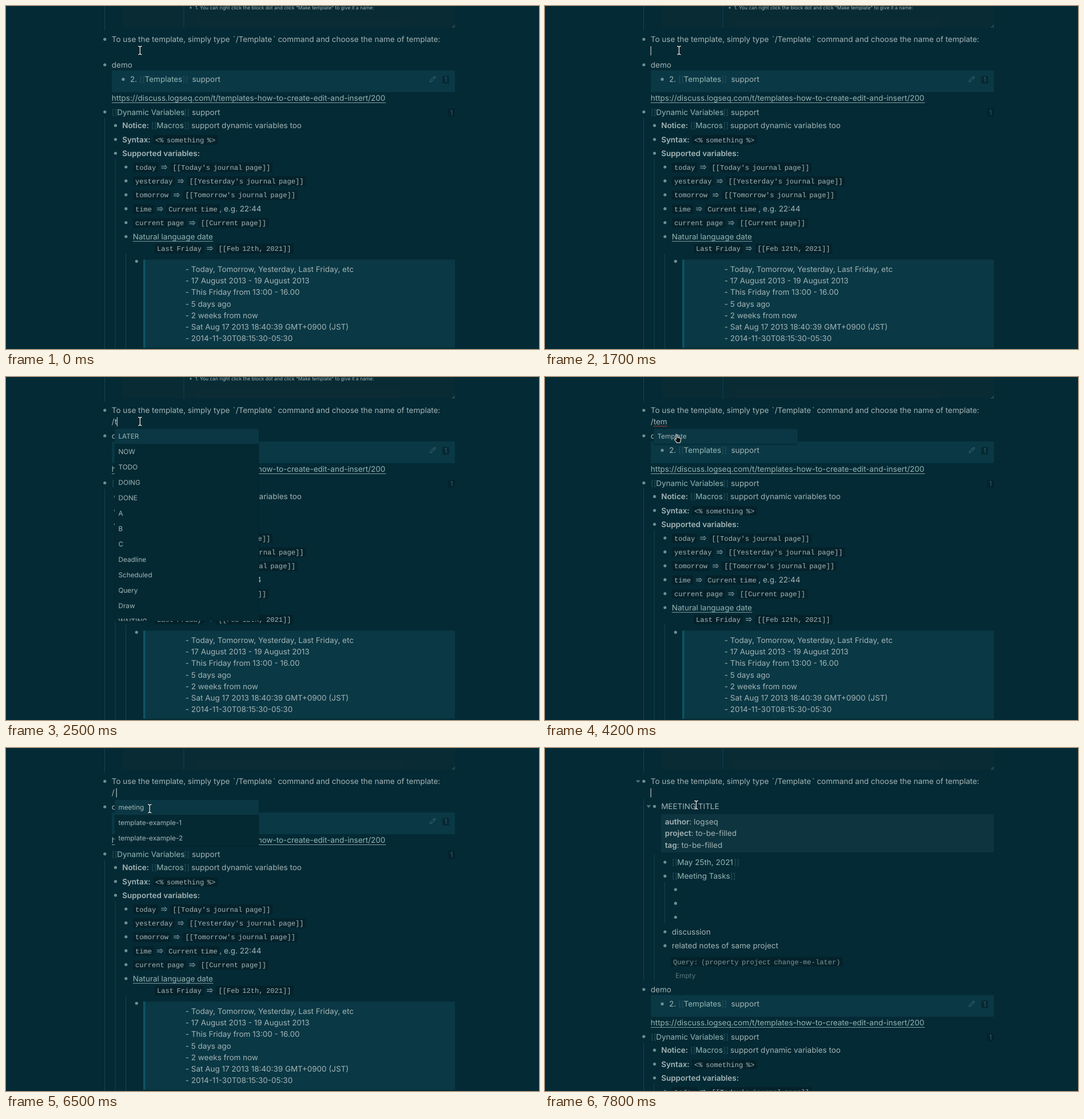
An HTML page that plays this animation: 932 px wide and 601 px high, repeating every 8 s.

```html
<!DOCTYPE html>
<html lang="en">
<head>
<meta charset="utf-8">
<title>Template demo</title>
<style>
  html, body { margin: 0; width: 100%; height: 100%; overflow: hidden; background: #042a35; }
  svg { display: block; width: 932px; height: 601px; }
  text { font: 13.47px Inter, sans-serif; fill: #a4b5b6; white-space: pre; text-rendering: geometricPrecision; }
  .b { font-weight: 600; }
  .link { fill: #96b7b4; }
  .dim { fill: #24505a; }
  .small { font-size: 11.79px; }
  .tiny { font-size: 8.44px; }
  .mono { font: 12.12px "Liberation Mono", monospace; word-spacing: -1.82px; }
  .faint { fill: #7d9698; }
  .empty { fill: #5c787e; }
  .count { fill: #34606b; font-size: 11.79px; }
  .menu { filter: drop-shadow(0 1px 1px rgba(0, 0, 0, .2)); }
</style>
</head>
<body>
<svg id="stage" viewBox="0 0 932 601"></svg>
<script>
const LOOP = 8000, SHIFT = 320;
const ADVANCE = 7.273, SPACE_CUT = 1.82, ARROW_GAP = 21.2;

// y is the middle of the capitals; the baseline lies below it
const text = (x, y, s, cls = '', drop = 4.9) =>
  `<text x="${x}" y="${y + drop}" class="${cls}">${s}</text>`;
const small = (x, y, s, cls = '') => text(x, y, s, 'small ' + cls, 4.3);
const rect = (x, y, w, h, fill, r = 0) =>
  `<rect x="${x}" y="${y}" width="${w}" height="${h}" rx="${r}" fill="${fill}"/>`;
const dot = (x, y, r = 2.6) => `<circle cx="${x}" cy="${y}" r="${r}" fill="#708e93"/>`;
const guide = (x, y1, y2) => rect(x - .5, y1, 1, y2 - y1, '#104653');
const fold = (x, y) => `<path d="M${x - 4} ${y - 2}h8l-4 4.6z" fill="#4f757c"/>`;
const escape = s => s.replace(/</g, '&lt;').replace(/>/g, '&gt;');

const codeWidth = s => s.length * ADVANCE - (s.split(' ').length - 1) * SPACE_CUT + 8;
const code = (x, y, s, cls = '') =>
  rect(x, y - 8.3, codeWidth(s), 17, '#05222b', 3) +
  text(x + 4, y, escape(s), 'mono ' + cls, 4.2);

const arrow = (x, y) =>
  `<path d="M${x} ${y - 1.6}h8.4M${x} ${y + 1.6}h8.4M${x + 6.4} ${y - 3.8}l3.8 3.8l-3.8 3.8" fill="none" stroke="#a4b5b6"/>`;

const mapping = (x, y, from, to) => {
  const end = x + codeWidth(from);
  return code(x, y, from) + arrow(end + 5, y) + code(end + ARROW_GAP, y, to);
};

const pageLink = (x, y, name, endX) =>
  text(x, y, '[[', 'dim') + text(x + 9.3, y, name, 'link') + text(endX, y, ']]', 'dim');

const underlined = (x, y, s, w) =>
  text(x, y, s, 'link') + rect(x, y + 7.8, w, .9, '#8fb0ae');

const count = (x, y) =>
  rect(x - 6, y - 6.6, 12, 13.6, 'rgba(4, 32, 41, .6)', 2) + text(x - 2.6, y, '1', 'count', 4.2);

const pencil = `<path d="M741.6 132.8l.8-3l6.2-6.2q1.1-.7 2 .2q.8 1 .1 2l-6.2 6.2zM747.2 125l2.2 2.2" fill="none" stroke="#45707a" stroke-width=".9"/>`;

function topPart() {
  return rect(203.5, 0, 581.5, 38, '#082b34') +
    rect(330, 22, 363, 15, '#0b2c34') +
    guide(172.5, 0, 43) + guide(311, 0, 38) +
    '<path d="M780 38l5-5M783 38l2-2" stroke="#5c777c" stroke-width=".9"/>' +
    `<g id="tip">${dot(323, 3, 1.7)}${text(330.7, 3, '1. You can right click the block dot and click "Make template" to give it a name:', 'tiny', 3)}</g>` +
    dot(172.8, 58.3) +
    text(184.8, 58.2, 'To use the template, simply type') +
    text(396.7, 58.2, '`') + text(401.7, 58.2, '/Template') + text(467, 58.2, '`') +
    text(475.4, 58.2, 'command and choose the name of template:');
}

function lowerPart() {
  const rows = [
    ['today', "[[Today's journal page]]"],
    ['yesterday', "[[Yesterday's journal page]]"],
    ['tomorrow', "[[Tomorrow's journal page]]"],
    ['time', 'Current time'],
    ['current page', '[[Current page]]']
  ];
  const dates = [
    'Today, Tomorrow, Yesterday, Last Friday, etc',
    '17 August 2013 - 19 August 2013',
    'This Friday from 13:00 - 16.00',
    '5 days ago',
    '2 weeks from now',
    'Sat Aug 17 2013 18:40:39 GMT+0900 (JST)',
    '2014-11-30T08:15:30-05:30'
  ];
  return guide(172.5, 196, 601) + guide(191, 268, 601) + guide(209.5, 434, 601) +
    dot(172.8, 103) + text(184.8, 103, 'demo') +
    rect(185, 113, 600, 38, '#0a3845') +
    dot(205, 128.4) + text(217, 128.4, '2.') + pageLink(233.3, 128.4, 'Templates', 308.3) +
    text(325.5, 128.4, 'support') + pencil + count(769, 129) +
    underlined(184.8, 161.2, 'https://discuss.logseq.com/t/templates-how-to-create-edit-and-insert/200', 479.5) +
    dot(172.8, 185.6) + pageLink(185, 185.6, 'Dynamic Variables', 311) +
    text(325, 185.6, 'support') + count(779, 186.5) +
    dot(191.5, 209.4) + text(203.2, 209.4, 'Notice:', 'b') + pageLink(254, 209.4, 'Macros', 311) +
    text(324, 209.4, 'support dynamic variables too') +
    dot(191.5, 233.8) + text(203.2, 233.8, 'Syntax:', 'b') + code(257, 234.3, '<% something %>') +
    dot(191.5, 258) + text(203.2, 258, 'Supported variables:', 'b') +
    rows.map(([from, to], i) => {
      const y = 282.4 + i * 24.4;
      return dot(209.8, y - .4) + mapping(222, y, from, to);
    }).join('') +
    text(373.3, 355.2, ', e.g. 22:44') +
    dot(209.8, 404) + underlined(221.8, 404, 'Natural language date', 140.5) +
    mapping(260, 424.7, 'Last Friday', '[[Feb 12th, 2021]]') +
    dot(228.3, 447.3) +
    rect(240, 444.3, 545, 154.5, '#0a3845') + rect(240, 444.3, 3.6, 154.5, '#0f5362') +
    dates.map((s, i) => text(313.8, 461 + i * 20.2, '- ' + s)).join('');
}

function meetingPart() {
  const property = (y, key, value) =>
    `<text x="209.8" y="${y + 4.9}"><tspan class="b">${key}</tspan>: ${value}</text>`;
  return guide(172.5, 89, 408) + guide(191, 187, 408) + guide(209.5, 235, 307) +
    fold(181.3, 102.3) + dot(191.5, 102.3) + text(203.2, 102.2, 'MEETING TITLE') +
    rect(203, 116, 582, 67, '#0d343f') +
    property(129.3, 'author', 'logseq') + property(149.5, 'project', 'to-be-filled') + property(169.7, 'tag', 'to-be-filled') +
    [200, 224.4, 322, 346.4].map(y => dot(209.8, y)).join('') +
    [248, 272.2, 296.5].map(y => dot(228.3, y)).join('') +
    pageLink(222, 200, 'May 25th, 2021', 330) + pageLink(222, 224.4, 'Meeting Tasks', 323.6) +
    text(221.8, 322, 'discussion') + text(221.8, 346.4, 'related notes of same project') +
    code(220, 374.3, 'Query: (property project change-me-later)', 'faint') +
    small(228, 398.6, 'Empty', 'empty');
}

const ROW = 26.94;
function menu(id, items, h = items.length * ROW) {
  return `<g id="${id}" class="menu"><clipPath id="${id}Clip"><rect x="190" y="91" width="252" height="${h}" rx="3"/></clipPath>` +
    `<g clip-path="url(#${id}Clip)">` + rect(190, 91, 252, h, '#042933') + rect(190, 91, 252, 26.2, '#0a3743') +
    items.map((s, i) => small(196.4, 104.1 + i * ROW, s)).join('') + '</g></g>';
}

const beamPath = 'M-2.8-7.3q2.3 0 2.8 1.6q.5-1.6 2.8-1.6M0-6V6M-2.8 7.3q2.3 0 2.8-1.6q.5 1.6 2.8 1.6';
const beam = id => `<g id="${id}" fill="none" stroke-linecap="round">` +
  `<path d="${beamPath}" stroke="#07161b" stroke-width="2.8"/><path d="${beamPath}" stroke="#eef2f2" stroke-width="1.3"/></g>`;
const hand = `<g id="hand"><path d="M-1.1 8.2V1a1.2 1.2 0 0 1 2.4 0V5l4.6 1q1.5.5 1.3 2l-.6 3.4l-1 2.9H.6L-3.9 9q.4-1.7 1.8-1.4z" fill="#0b0f11" stroke="#eef2f2" stroke-width="1.1" stroke-linejoin="round"/></g>`;

const $ = id => document.getElementById(id);
$('stage').innerHTML = topPart() +
  `<g id="lower">${lowerPart()}</g><g id="meeting">${meetingPart()}</g>` +
  `<g id="topFold">${fold(162.8, 58.5)}</g>` +
  '<text id="typed" x="184.8" y="83.3"></text>' +
  '<path id="squiggle" d="M190 86.3H213.5" stroke="#b8433d" stroke-width="1.5" stroke-dasharray="1.6 .9"/>' +
  menu('commands', ['LATER', 'NOW', 'TODO', 'DOING', 'DONE', 'A', 'B', 'C', 'Deadline', 'Scheduled', 'Query', 'Draw', 'WAITING'], 336.5) +
  menu('match', ['Template']) +
  menu('templates', ['meeting', 'template-example-1', 'template-example-2'], 80) +
  '<rect id="caret" y="70.5" width="1.2" height="16" fill="#b9c7c8"/>' +
  beam('trail') + beam('beam') + hand;

// Each step changes only the listed properties.
const steps = [
  [0, { typed: '', caret: 0, menu: '', cursor: 'beam', x: 234.4, y: 77.8, done: false, trail: false, fold: false }],
  [500, { caret: 184.5 }],
  [1100, { caret: 0 }],
  [1700, { caret: 184.5 }],
  [1900, { typed: '/', caret: 189.9, menu: 'commands' }],
  [2500, { typed: '/t', caret: 193.8 }],
  [4200, { typed: '/tem', caret: 0, menu: 'match', cursor: 'hand', x: 230.4, y: 101 }],
  [4400, { caret: 213.4, x: 231, y: 102 }],
  [4700, { typed: '/ ', caret: 192.6, menu: 'templates' }],
  [5300, { caret: 0 }],
  [5600, { cursor: 'beam', x: 248.5, y: 68.5 }],
  [5900, { cursor: 'hand', x: 251.5, y: 103 }],
  [6200, { caret: 192.6, x: 252, y: 103.5 }],
  [6500, { cursor: 'beam', x: 251.3, y: 106.3 }],
  [6800, { typed: '', caret: 184.5, menu: '', done: true }],
  [7100, { caret: 0, x: 357.5, y: 39.5, trail: true }],
  [7400, { x: 284, y: 87, trail: false }],
  [7800, { caret: 184.5, x: 264.4, y: 99.8, fold: true }]
];

const show = (id, on) => $(id).setAttribute('visibility', on ? 'visible' : 'hidden');
const place = (id, x, y) => $(id).setAttribute('transform', `translate(${x} ${y})`);

function draw(t) {
  const s = Object.assign({}, ...steps.filter(([at]) => at <= t).map(([, change]) => change));
  show('tip', t < 4200);
  $('typed').textContent = s.typed;
  show('squiggle', s.typed === '/tem');
  show('caret', s.caret > 0);
  $('caret').setAttribute('x', s.caret);
  for (const id of ['commands', 'match', 'templates']) show(id, s.menu === id);
  show('meeting', s.done);
  place('lower', 0, s.done ? SHIFT : 0);
  show('topFold', s.fold);
  for (const id of ['beam', 'hand']) {
    show(id, s.cursor === id);
    place(id, s.x, s.y);
  }
  show('trail', s.trail);
  place('trail', 251.3, 106.3);
}

const start = performance.now();
function tick() {
  draw((performance.now() - start) % LOOP);
  requestAnimationFrame(tick);
}
tick();
</script>
</body>
</html>
```
